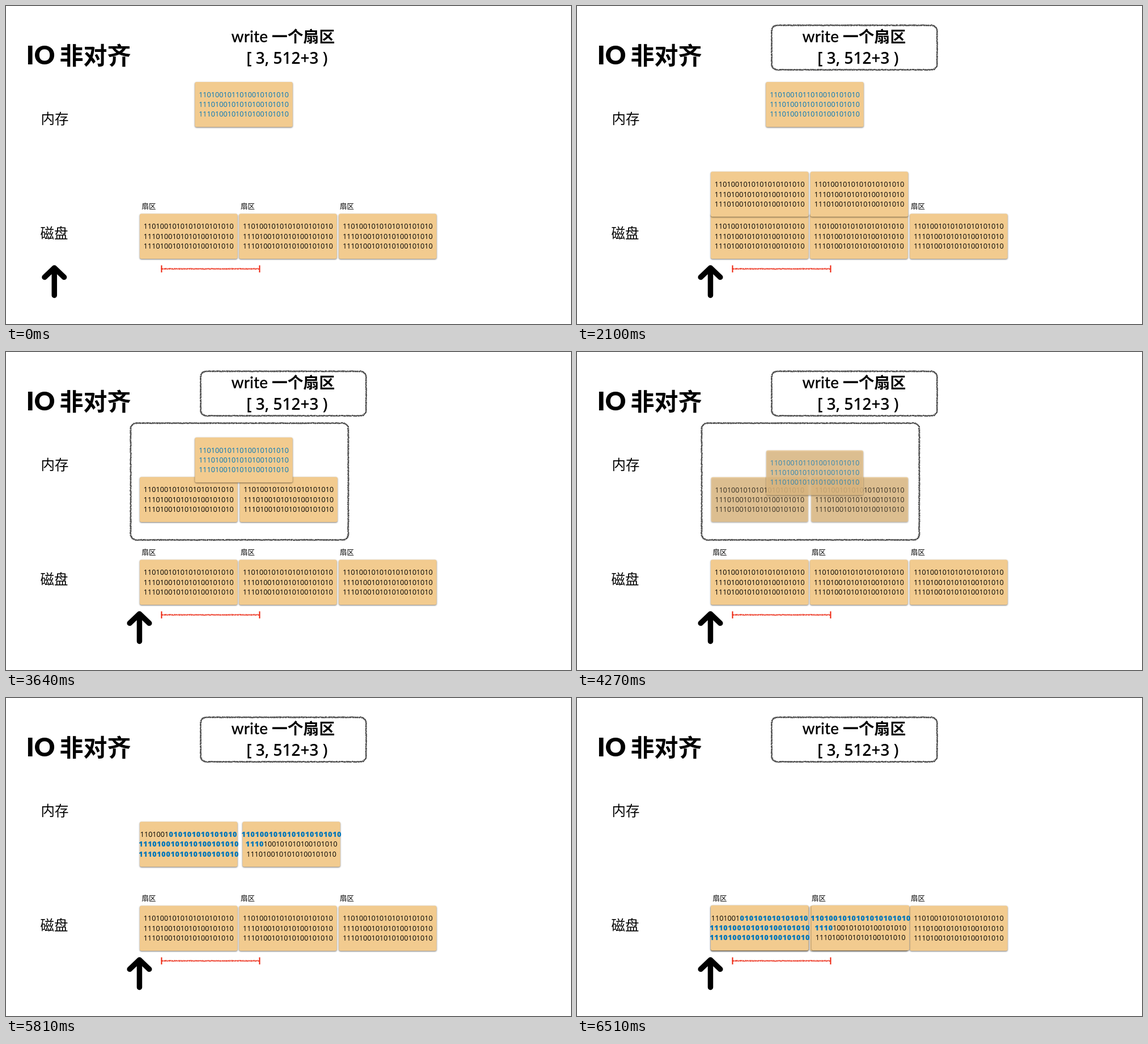
Write an HTML page with a canvas that moves like this. It is 997 px wide and 561 px high and loops after 6.58 s.

```html
<!DOCTYPE html>
<html lang="zh">
<head>
<meta charset="utf-8">
<style>
html, body { margin: 0; width: 100%; height: 100%; overflow: hidden; background: #fff; }
canvas { display: block; }
</style>
</head>
<body>
<canvas id="stage" width="997" height="561"></canvas>
<script>
const LOOP = 6580, STEP = 70;
const W = 172.5, H = 79.5;
const BLUE = '#0076ba', RED = '#ee220c', TAN = '#f2cb8f';
const CJK = '"Noto Sans CJK SC", "Noto Sans CJK JP", "Noto Sans CJK", sans-serif';
const LATIN = 'Lato, sans-serif', DIGITS = '"Open Sans", "Noto Sans", sans-serif';
const PITCH = 7.22, BOLD_PITCH = 8.04;
const ctx = document.getElementById('stage').getContext('2d');

// Digits after "*" are bold and blue, digits after "/" are plain.
const ROW = '1110100101010100101010', TOP_ROW = '1101001010101010101010';
const SECTOR = [TOP_ROW, ROW, ROW];
const NEW_DATA = ['1101001011010010101010', ROW, ROW];
const MERGED_LEFT = ['1101001*010101010101010', '*' + ROW, '*' + ROW];
const MERGED_RIGHT = ['*' + TOP_ROW, '*1110/100101010100101010', ROW];

const mix = (a, b, p) => a + (b - a) * p;
const span = (t, start, end) => Math.min(1, Math.max(0, (t - start) / (end - start)));
const ease = (t, start, end) => (1 - Math.cos(Math.PI * span(t, start, end))) / 2;
const noise = n => { const s = Math.sin(n * 12.9898) * 43758.5453; return s - Math.floor(s) - 0.5; };

function text(str, x, y, font, align = 'left') {
  ctx.font = font;
  ctx.textAlign = align;
  ctx.fillStyle = '#000';
  ctx.fillText(str, x, y);
}

function digitRow(row, cx, y, color) {
  const cells = [];
  let bold = false, width = 0;
  for (const ch of row) {
    if (ch === '*' || ch === '/') { bold = ch === '*'; continue; }
    const pitch = bold ? BOLD_PITCH : PITCH;
    cells.push([ch, bold, width + pitch / 2]);
    width += pitch;
  }
  ctx.textAlign = 'center';
  for (const [ch, heavy, x] of cells) {
    ctx.font = `${heavy ? 800 : 400} 12.6px ${DIGITS}`;
    ctx.fillStyle = heavy ? BLUE : color;
    ctx.fillText(ch, cx - width / 2 + x, y);
  }
}

function block(x, y, rows, { color = '#000', alpha = 1, scale = 1 } = {}) {
  if (alpha <= 0 || scale <= 0) return;
  ctx.save();
  ctx.globalAlpha = alpha;
  ctx.translate(x + W / 2, y + H / 2);
  ctx.scale(scale, scale);
  ctx.save();
  ctx.shadowColor = 'rgba(0,0,0,.55)';
  ctx.shadowBlur = 2.5;
  ctx.shadowOffsetY = 1;
  ctx.fillStyle = TAN;
  ctx.beginPath();
  ctx.roundRect(-W / 2, -H / 2, W, H, 3);
  ctx.fill();
  ctx.restore();
  rows.forEach((row, i) => digitRow(row, 0, 4.4 + (i - 1) * 17.2, color));
  ctx.restore();
}

function tracePath(d) {
  const path = document.createElementNS('http://www.w3.org/2000/svg', 'path');
  path.setAttribute('d', d);
  const points = [], length = path.getTotalLength();
  for (let s = 0; s < length; s++) points.push(path.getPointAtLength(s));
  return points;
}

function frame(x, y, w, h, r = 10) {
  const arc = (dx, dy) => `a${r} ${r} 0 0 1 ${dx} ${dy}`;
  return tracePath(`M${x + 16} ${y}H${x + w - r}${arc(r, r)}V${y + h - r}${arc(-r, r)}` +
    `H${x + r}${arc(-r, -r)}V${y + r}${arc(r, -r)}H${x + 16}`);
}

// Rough crayon line along the first part of a path.
function crayon(points, part, color, size) {
  ctx.save();
  ctx.fillStyle = color;
  ctx.globalAlpha = 0.5;
  const end = Math.floor(points.length * part);
  for (let i = 0; i < end; i++) {
    for (let k = 0; k < 3; k++) {
      const n = i * 3 + k;
      ctx.fillRect(points[i].x - size / 2 + noise(n + 1) * 2,
                   points[i].y - size / 2 + noise(n + 5000) * 2, size, size);
    }
  }
  ctx.restore();
}

function arrow(x) {
  ctx.strokeStyle = '#000';
  ctx.lineWidth = 9.5;
  ctx.lineCap = ctx.lineJoin = 'round';
  ctx.beginPath();
  ctx.moveTo(x - 17.3, 478.5);
  ctx.lineTo(x, 462);
  ctx.lineTo(x + 17.3, 478.5);
  ctx.moveTo(x, 463);
  ctx.lineTo(x, 510.5);
  ctx.stroke();
}

const titleFrame = frame(343.5, 34, 292, 78.5);
const memoryFrame = frame(220, 125.5, 384, 206);
const rangeLine = tracePath('M275 463.7H447');

function range() {
  crayon(rangeLine, 1, RED, 1.3);
  ctx.fillStyle = RED;
  ctx.fillRect(273.5, 457.5, 2, 12.5);
  ctx.fillRect(446.5, 457.5, 2, 12.5);
}

function labels() {
  text('IO', 61, 103, `900 45px ${LATIN}`, 'center');
  text('非对齐', 94.5, 103, `700 42px ${CJK}`);
  text('write', 397.5, 64, `600 28px ${LATIN}`);
  text('一个扇区', 469, 64, `600 27.8px ${CJK}`);
  text('[ 3, 512+3 )', 496, 102, `600 28px ${DIGITS}`, 'center');
  text('内存', 61.5, 207.5, `400 24.5px ${CJK}`);
  text('磁盘', 60.5, 410, `400 24.5px ${CJK}`);
}

function memory(t) {
  const leaving = span(t, 4180, 4630);
  const look = { alpha: 1 - Math.min(1, leaving * 1.2), scale: 1 - leaving ** 3 };
  if (t >= 1590) {
    const up = ease(t, 1595, 2595);
    const y = mix(366.5, 220.5, up);
    block(236, y, SECTOR, look);
    block(mix(411.2, 412.5, up), y, SECTOR, look);
  }
  block(333.3, mix(134, 173.2, ease(t, 3207, 4162)), NEW_DATA, { ...look, color: BLUE });
}

function merged(t) {
  const u = span(t, 4830, 5530);
  if (!u) return;
  const look = {
    alpha: Math.min(1, u * 1.25),
    scale: u < 1 ? 1 - Math.exp(-6.35 * u) * Math.cos(5.77 * u) : 1
  };
  const down = ease(t, 5553, 6508);
  const y = mix(188.3, 365.7, down);
  block(236, y, MERGED_LEFT, look);
  block(mix(418, 414, down), y, MERGED_RIGHT, look);
}

function draw(t) {
  ctx.fillStyle = '#fff';
  ctx.fillRect(0, 0, 997, 561);
  labels();
  crayon(titleFrame, ease(t, 0, 580), '#333', 1.5);
  [236, 411.2, 587.3].forEach((x, i) => {
    text('扇区', [239.5, 414, 589][i], 358, `400 12.5px ${CJK}`);
    block(x, 366.5, SECTOR);
  });
  range();
  memory(t);
  if (t < 4760) crayon(memoryFrame, ease(t, 2540, 3240), '#333', 1.5);
  merged(t);
  arrow(mix(85.3, 235.5, ease(t, 552, 1547)));
}

const begin = performance.now();
function tick() {
  const t = (performance.now() - begin) % LOOP;
  draw(Math.floor(t / STEP) * STEP);
  requestAnimationFrame(tick);
}
tick();
</script>
</body>
</html>
```
